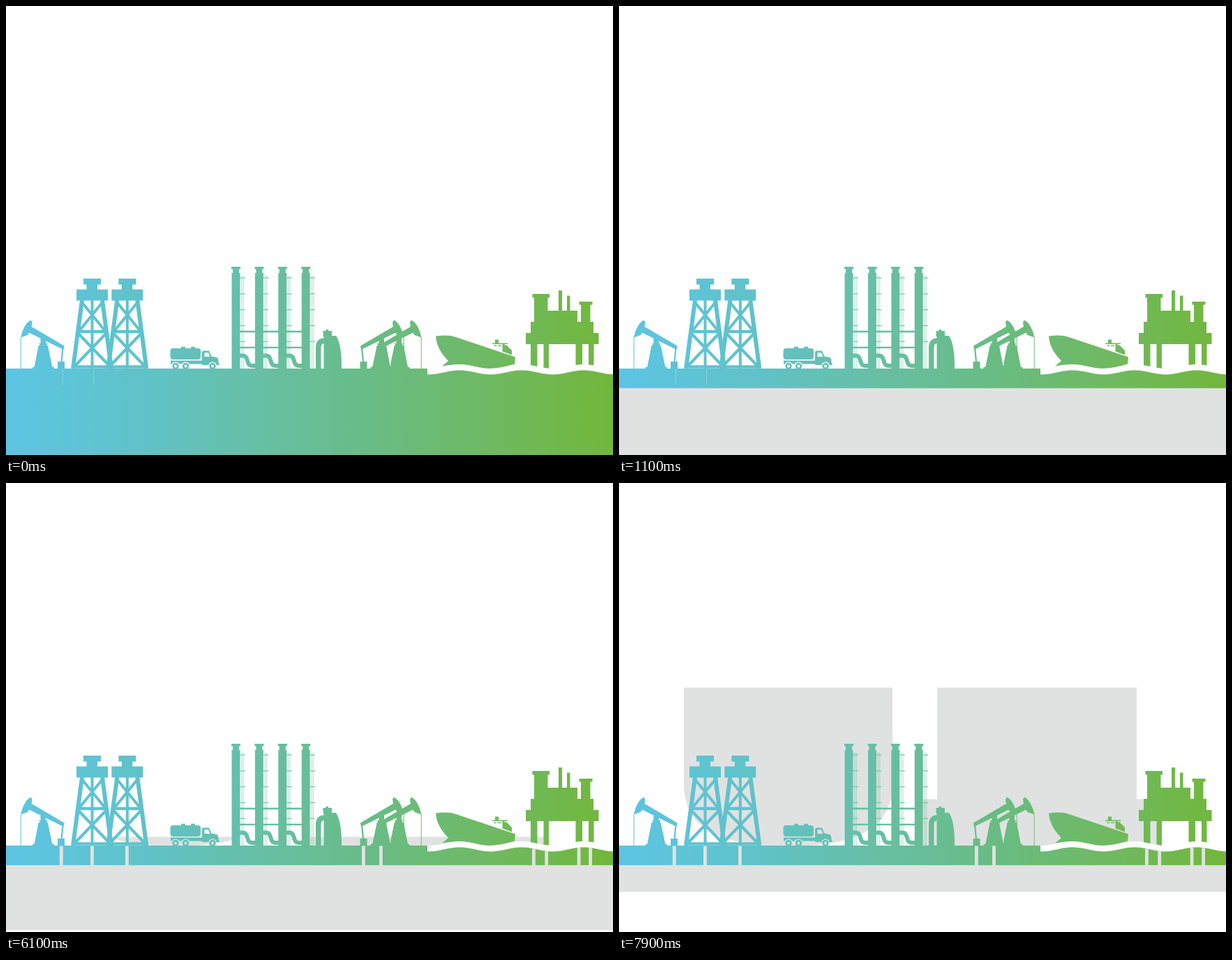
An HTML page with a canvas for the animation above (8000 ms loop, 870 by 644 pixels).

```html
<!DOCTYPE html>
<html lang="en">
<head>
<meta charset="utf-8">
<title>Energy skyline</title>
<style>
  html, body { margin: 0; width: 100%; height: 100%; overflow: hidden; background: #fff; }
  canvas { display: block; }
</style>
</head>
<body>
<canvas id="stage" width="870" height="644"></canvas>
<script>
const W = 870, H = 644, LOOP = 8000, STEP = 100;
const GROUND = 520, LAYER = 548.5, SHORE = 604;
const GREY = '#e0e2e1';
const ctx = document.getElementById('stage').getContext('2d');

const grad = ctx.createLinearGradient(0, 0, W, 0);
['#5cc5e4', '#60c2c6', '#67bfa5', '#68bc86', '#6fb962', '#72b73a']
  .forEach((c, i) => grad.addColorStop([0, 0.24, 0.42, 0.6, 0.8, 1][i], c));

// Silhouettes are drawn as a mask, cut out, then tinted with the gradient.
const art = document.createElement('canvas');
art.width = W;
art.height = H;
const g = art.getContext('2d');

const box = (x1, y1, x2, y2) => g.fillRect(x1, y1, x2 - x1, y2 - y1);
const fill = d => g.fill(new Path2D(d));
const line = (d, w) => { g.lineWidth = w; g.stroke(new Path2D(d)); };
const disc = (x, y, r) => { g.beginPath(); g.arc(x, y, r, 0, 7); g.fill(); };
function cut(draw) {
  g.globalCompositeOperation = 'destination-out';
  draw();
  g.globalCompositeOperation = 'source-over';
}
function place(x, flip, draw) {
  g.save();
  g.translate(x, 0);
  g.scale(flip ? -1 : 1, 1);
  draw();
  g.restore();
}

function pumpjack() {
  fill('M35 450.5 Q25 457 21 475.5 L31 472 Q37 464 37.5 453Z');
  fill('M35 459 L83.5 487.5 L82.5 493 L32 468Z');
  line('M21.3 475 V520', 1);
  line('M81.5 490 L79.5 511', 2.2);
  box(74, 510, 84, 520);
  box(49.5, 477, 57, 485);
  fill('M47 484 H60 L58 487 H49Z');
  fill('M46.5 487 H60 L66.5 518 H69 V520 H38 V518 H40.5Z');
  cut(() => line('M45.5 490 L40 516 M61 490 L66.5 516', 0.7));
}

function derrick() {
  box(111, 391, 136, 399.5);
  box(115.5, 399, 131, 407);
  box(101, 406.5, 146, 422.5);
  line('M109 422 L96 520 M138 422 L151 520', 6);
  line('M108 424 L142 466 M139 424 L105 466', 4);
  line('M102 468 L148 516 M145 468 L99 516', 4.2);
  line('M102 467 H145 M97 517.5 H150', 4.5);
  line('M123.5 422 V520', 4);
}

function truck() {
  g.beginPath();
  g.roundRect(235.5, 491, 43.5, 16, 4);
  g.fill();
  box(251, 488.7, 257, 492);
  box(265, 488.7, 271, 492);
  box(236, 508.5, 283, 513.5);
  fill('M281 514 V497 Q281 494.5 283 494.5 H291 L294.5 502.5 L302 504 Q304.5 505 304.5 511 L306 515 H281Z');
  cut(() => {
    fill('M284.5 497.3 H290 L292.3 503 H284.5Z');
    for (const x of [243, 257.5, 296]) disc(x, 516.5, 6);
  });
  for (const x of [243, 257.5, 296]) {
    disc(x, 516.5, 4.7);
    cut(() => disc(x, 516.5, 2));
  }
}

function stack(i) {
  box(323, 374, 336, 377.3);
  box(325, 377, 334, 384);
  box(323.5, 383, 335.5, 520);
  g.globalAlpha = 0.45;
  line('M337.5 387 V520 M340.5 387 V520', 0.7);
  g.setLineDash([1, 1.6]);
  line('M339 387 V520', 3);
  g.setLineDash([]);
  g.globalAlpha = 0.85;
  for (let y = 389.5; y < 500; y += 22.8) box(335, y, 343, y + 1.2);
  g.globalAlpha = 1;
  if (i < 3) line('M335 501.5 H339 C349 501.5 343 516 353 516 H358', 6);
}

function refinery() {
  for (let i = 0; i < 4; i++) place(33.4 * i, false, () => stack(i));
  box(335, 465.7, 424, 468.3);
  box(335, 488.7, 424, 491);
  line('M447.7 520 V490 Q447.7 480 457 480', 7.5);
  fill('M455.5 520 V474 H454.5 V466 H458.5 V464 H462 V466 H467 V473 H473 Q481.5 486 481 520Z');
}

function ship() {
  fill('M616 473.5 Q634 471 645 475 L730 503.5 L729 513.5 Q710 519.5 692 520 Q665 520 651 514.5 Q637 514 625 516.5 L634 509 Q617 492 616 473.5Z');
  fill('M711.5 484.5 L718 487 L725 494 V500.5 L711.5 495.5Z');
  box(697, 483.5, 719, 485);
  box(701, 478.5, 706, 484);
  box(699.5, 486.5, 703, 488);
  box(705, 486.5, 710, 488);
}

function platform() {
  box(754.5, 413, 779, 418.5);
  box(757, 418, 776.5, 454);
  box(757, 437, 819, 454);
  box(792, 408, 797, 438);
  box(804, 415.5, 808.5, 438);
  box(821.5, 424, 840.5, 428.5);
  box(824, 428, 837.5, 454);
  box(752, 453, 842, 470);
  box(745, 469, 849.5, 485);
  for (const [a, b] of [[752, 761.5], [770.5, 778], [816.5, 826], [835, 842.5]]) box(a, 484, b, 524);
}

const wave = x => 525.5 - 3 * Math.cos((x - 650) * 2 * Math.PI / 89);
function wavePath(c, lift) {
  c.beginPath();
  c.moveTo(SHORE, LAYER);
  for (let x = SHORE; x <= W; x += 2) c.lineTo(x, wave(x) - lift);
  c.lineTo(W, LAYER);
  c.closePath();
}

function buildArt() {
  place(0, false, pumpjack);
  place(0, false, derrick);
  place(50.3, false, derrick);
  truck();
  refinery();
  place(616.5, true, pumpjack);
  place(591.5, true, pumpjack);
  ship();
  platform();
  cut(() => { wavePath(g, 8.5); g.fill(); });
  box(0, GROUND, SHORE, LAYER);
  wavePath(g, 0);
  g.fill();
  g.globalCompositeOperation = 'source-in';
  g.fillStyle = grad;
  g.fillRect(0, 0, W, H);
}

const tank = new Path2D('M93 0 V432 C93 492 140 521 242.5 521 C345 521 392 492 392 432 V0Z M456 0 V453.5 H436 V530 H774 V453.5 H742 V0Z');
const wells = [76.8, 121, 171, 510, 535, 754, 772.3, 818.7, 835.2];
const ramp = (t, from) => Math.min(1, Math.max(0, (t - from) / 1000));

function drawTank(top) {
  ctx.save();
  ctx.beginPath();
  ctx.rect(0, top, W, LAYER - top);
  ctx.clip();
  ctx.fillStyle = GREY;
  ctx.fill(tank);
  ctx.restore();
  ctx.fillStyle = '#fff';
  wavePath(ctx, 8.5);
  ctx.fill();
}

function draw(t) {
  const pump = Math.max(0, t - 6000);
  const depth = (pump ? 644.5 - 0.0305 * pump : H) - LAYER;
  ctx.fillStyle = '#fff';
  ctx.fillRect(0, 0, W, H);
  if (pump) drawTank(519.5 - 0.119 * pump);
  ctx.drawImage(art, 0, 0);

  ctx.fillStyle = 'rgba(255,255,255,.35)';
  ctx.fillRect(81, 521, 0.8, 22);
  ctx.fillRect(125.2, 521, 0.8, 22);

  const fade = ramp(t, 0);
  if (fade < 1) {
    ctx.fillStyle = grad;
    ctx.fillRect(0, LAYER - 0.5, W, depth + 0.5);
  }
  ctx.fillStyle = GREY;
  ctx.globalAlpha = fade;
  ctx.fillRect(0, LAYER, W, depth);

  ctx.globalAlpha = ramp(t, 3000);
  for (const x of wells) {
    const top = x < SHORE ? GROUND + 0.5 : wave(x + 2.4);
    ctx.fillRect(x, top, 4.8, LAYER - top + 0.5);
  }
  ctx.globalAlpha = 1;
}

function frame() {
  const t = performance.now() % LOOP;
  draw(Math.floor(t / STEP) * STEP);
  requestAnimationFrame(frame);
}

buildArt();
frame();
</script>
</body>
</html>
```
